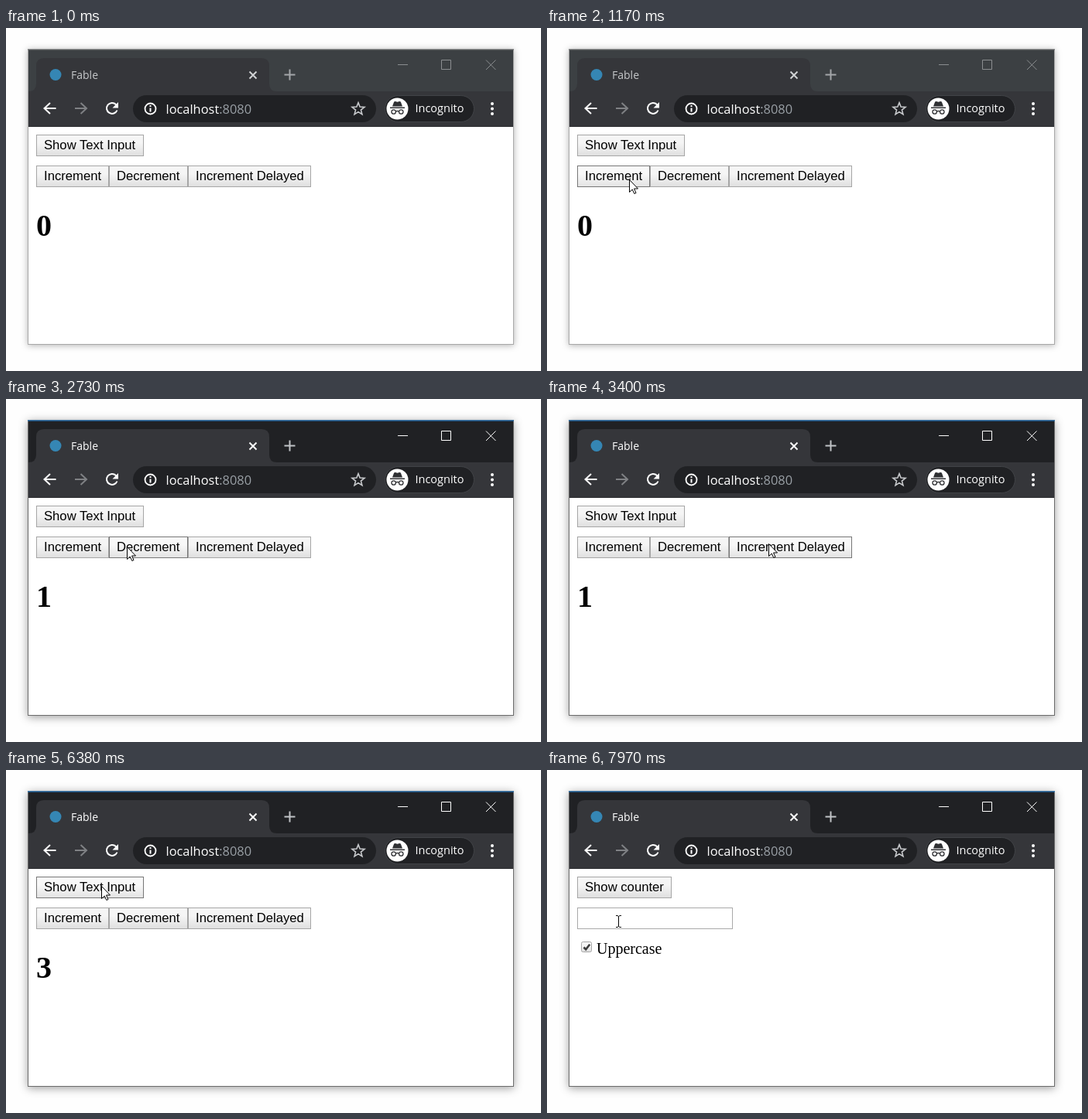
Write an HTML page that moves like this. It is 691 px wide and 444 px high and loops after 8000 ms.

```html
<!DOCTYPE html>
<html lang="en">
<head>
<meta charset="utf-8">
<title>Fable</title>
<style>
  html, body { margin: 0; width: 100%; height: 100%; overflow: hidden; background: #fefefe; }
  svg { display: block; width: 691px; height: 444px; }
  text { white-space: pre; }
  .ui { font-family: "Open Sans", "Noto Sans", sans-serif; fill: #fff; }
  .btn text { font: 16.667px "Liberation Sans", Arial, sans-serif; }
  .btn rect { fill: url(#face); stroke: #a6a6a6; }
  .btn.hover rect { fill: url(#faceHover); stroke: #777; }
  .btn.down rect { fill: url(#faceDown); stroke: #777; }
  .serif { font-family: "Liberation Serif", "Times New Roman", serif; }
  .line { fill: none; stroke: #fff; }

  #frame { fill: #fff; filter: drop-shadow(0 2px 6px rgba(0, 0, 0, .38)); }
  #bar { fill: #202124; }
  #edge { fill: none; stroke: #6b6b6b; }
  #accent { stroke: #1a7fd4; }
  #title { font-size: 14px; }
  #plus { stroke: #c0c3c6; stroke-width: 2; }
  .idle #frame { filter: drop-shadow(0 1px 4px rgba(0, 0, 0, .3)); }
  .idle #bar { fill: #3c4043; }
  .idle #edge { stroke: #a8a8a8; }
  .idle #accent { stroke: #6c6f71; }
  .idle #title { fill: #c6c8ca; }
  .idle #close { stroke: #d0d2d4; }
  .idle #plus { stroke: #a3a6a9; }
  .idle #controls { stroke: #8b8e90; }
</style>
</head>
<body>
<svg id="stage" viewBox="0 0 691 444">
  <defs>
    <linearGradient id="face" x2="0" y2="1">
      <stop offset=".38" stop-color="#f5f5f5"/><stop offset="1" stop-color="#dfdfdf"/>
    </linearGradient>
    <linearGradient id="faceHover" x2="0" y2="1">
      <stop offset=".38" stop-color="#f8f8f8"/><stop offset="1" stop-color="#e3e3e3"/>
    </linearGradient>
    <linearGradient id="faceDown" x2="0" y2="1">
      <stop offset=".38" stop-color="#e7e7e7"/><stop offset="1" stop-color="#d5d5d5"/>
    </linearGradient>
  </defs>

  <!-- window and tab strip -->
  <rect id="frame" x="28" y="27" width="628" height="383"/>
  <rect id="bar" x="29" y="28" width="626" height="54"/>
  <path fill="#35363a" d="M29 82Q39 82 39 72V49Q39 39 49 39H330Q340 39 340 49V72Q340 82 350 82H655V128H29Z"/>
  <path stroke="#2a2b2e" d="M29 127.5H655"/>
  <rect id="edge" x="28.5" y="27.5" width="627" height="382"/>
  <path id="accent" d="M28 28H656"/>
  <circle cx="64" cy="60.5" r="7.5" fill="#3586b4"/>
  <text id="title" class="ui" x="84" y="66">Fable</text>
  <path id="close" class="line" stroke-width="2" d="M314.5 56.5l9 9m0-9l-9 9"/>
  <path id="plus" class="line" d="M359.5 60.5h14M366.5 53.5v14"/>
  <path id="controls" class="line" d="M506 47.5h13M562.5 41.5h12v12h-12zM620 41.5l12.5 12.5m0-12.5l-12.5 12.5"/>

  <!-- toolbar -->
  <path class="line" stroke-width="2" d="M64.500 104H50M57 97l-7.500 7 7.500 7"/>
  <path class="line" style="stroke:#7f8184" stroke-width="2" d="M89 104h14.500M96.500 97l7.500 7-7.500 7"/>
  <path class="line" stroke-width="2" d="M143.500 106.500A7 7 0 1 1 142 99l1 1"/>
  <path fill="#fff" d="M145 96v7.500h-7.500z"/>
  <rect x="164" y="87" width="314" height="35" rx="17.500" fill="#202124"/>
  <circle class="line" cx="186.500" cy="104.500" r="7" stroke-width="1.800"/>
  <path class="line" stroke-width="2" d="M186.500 103.500v5M186.500 100v2"/>
  <text class="ui" x="206.500" y="111" font-size="16.400">localhost<tspan fill="#9aa0a6">:8080</tspan></text>
  <path id="star" class="line" style="stroke:#c8cacd" stroke-width="1.600"/>
  <rect x="489.500" y="87.500" width="115" height="34" rx="17" fill="#202124" stroke="#414347"/>
  <circle cx="505.500" cy="104.500" r="14" fill="#fff"/>
  <path fill="#303134" d="M496 102.500h19v1.500h-19zM499 101.500l2-5.500q.5-1.500 2-1l2.500.7 2.500-.7q1.500-.5 2 1l2 5.500z"/>
  <path fill="none" stroke="#303134" stroke-width="1.300" d="M498 108.500a2.700 2.700 0 1 0 5.400 0a2.700 2.700 0 1 0-5.400 0M507.600 108.500a2.700 2.700 0 1 0 5.400 0a2.700 2.700 0 1 0-5.400 0M503.400 108q2.100-1 4.200 0"/>
  <text class="ui" x="528.500" y="109" font-size="14.500">Incognito</text>
  <path stroke="#fff" stroke-width="4" stroke-linecap="round" d="M628 98h0M628 104.500h0M628 111h0"/>

  <!-- pages -->
  <g id="counter"><text id="count" class="serif" x="39" y="269" font-size="40" font-weight="700">0</text></g>
  <g id="form">
    <rect x="39.500" y="178.500" width="200" height="27" fill="#fff" stroke="#a9a9a9"/>
    <rect id="box" x="44.500" y="222.500" width="13" height="13" rx="2" fill="url(#face)" stroke="#a6a6a6"/>
    <path id="tick" fill="none" stroke="#3c3c3c" stroke-width="2.600" d="M47.500 229.500l2.700 2.800 5-6.500"/>
    <text class="serif" x="64" y="238" font-size="20">Uppercase</text>
  </g>

  <g id="pointer">
    <path id="arrow" fill="#fff" stroke="#000" d="M.5.500V16.500L4.200 13 6.800 18.500 9 17.500 6.500 12H11.500Z"/>
    <path id="beam" fill="none" stroke="#000" d="M-3 -7.500H-1L.5 -6.500 2 -7.500H4M.5 -6.500V6.500M-3 7.500H-1L.5 6.500 2 7.500H4"/>
  </g>
</svg>
<script>
const LOOP = 8000, ACTIVATE = 1250, SWITCH = 6530, CHECK = 7640;
const $ = id => document.getElementById(id);

// pointer strokes: start, end, then start point, control point, end point
const strokes = [
  [200, 1170, 541, 443, 237, 342, 105.5, 195.500],
  [2010, 2280, 105.5, 195.500, 130, 180, 156, 191],
  [2730, 3280, 156, 191, 225, 178, 286, 187],
  [5960, 6420, 286, 187, 150, 112, 122, 152],
  [6960, 7520, 122, 152, 101, 216, 89.5, 238],
  [7770, 7970, 89.5, 238, 90, 215, 92, 196]
];
const presses = [[1250, 1340], [1630, 1730], [2310, 2400], [3310, 3400], [4670, 4770], [6450, 6530], [7560, 7640]];
const counts = [[0, 0], [1340, 1], [1730, 2], [2400, 1], [4380, 2], [5750, 3]];

function addButton(parent, label, x, y, w) {
  const g = document.createElementNS("http://www.w3.org/2000/svg", "g");
  g.innerHTML = `<rect x="${x + .5}" y="${y + .5}" width="${w - 1}" height="27"/><text x="${x + 10}" y="${y + 19}">${label}</text>`;
  parent.append(g);
  return { g, parent, area: [x, y, w, 28] };
}
const buttons = [
  addButton($("counter"), "Show Text Input", 39, 138, 139),
  addButton($("counter"), "Increment", 39, 178, 94),
  addButton($("counter"), "Decrement", 133, 178, 102),
  addButton($("counter"), "Increment Delayed", 235, 178, 159),
  addButton($("form"), "Show counter", 39, 138, 122)
];

$("star").setAttribute("d", "M" + Array.from({ length: 10 }, (_, i) => {
  const r = i % 2 ? 3.6 : 8.4, a = i * Math.PI / 5;
  return `${455 + r * Math.sin(a)} ${105 - r * Math.cos(a)}`;
}).join("L") + "Z");

const show = (el, on) => el.style.display = on ? "" : "none";
const inside = ([px, py], [x, y, w, h]) => px >= x && px < x + w && py >= y && py < y + h;

function pointerAt(t) {
  const [t0, t1, x0, y0, cx, cy, x1, y1] = strokes.findLast(s => t >= s[0]) || strokes[0];
  const u = Math.min(1, Math.max(0, (t - t0) / (t1 - t0)));
  const s = u * u * (3 - 2 * u), r = 1 - s;
  const mix = (a, b, c) => r * r * a + 2 * r * s * b + s * s * c;
  return [mix(x0, cx, x1), mix(y0, cy, y1)];
}

function draw(t) {
  const p = pointerAt(t), moved = t >= 200, onForm = t >= SWITCH;
  const down = presses.some(([a, b]) => t >= a && t < b);
  const page = $(onForm ? "form" : "counter");
  $("stage").classList.toggle("idle", t < ACTIVATE);
  show($("counter"), !onForm);
  show($("form"), onForm);
  $("count").textContent = counts.findLast(c => t >= c[0])[1];
  for (const b of buttons) {
    const hover = moved && b.parent === page && inside(p, b.area);
    b.g.setAttribute("class", "btn" + (hover ? down ? " down" : " hover" : ""));
  }
  const overLabel = onForm && inside(p, [44, 220, 104, 23]);
  $("box").setAttribute("stroke", overLabel ? "#777" : "#a6a6a6");
  $("box").setAttribute("fill", overLabel && down ? "url(#faceDown)" : "url(#face)");
  show($("tick"), t >= CHECK);

  const typing = onForm && inside(p, [39, 178, 201, 28]);
  show($("pointer"), moved);
  show($("arrow"), !typing);
  show($("beam"), typing);
  $("pointer").setAttribute("transform", `translate(${p.map(Math.round)})`);
}

const start = performance.now();
function tick(now) {
  draw(Math.max(0, now - start) % LOOP);
  requestAnimationFrame(tick);
}
tick(start);
</script>
</body>
</html>
```
